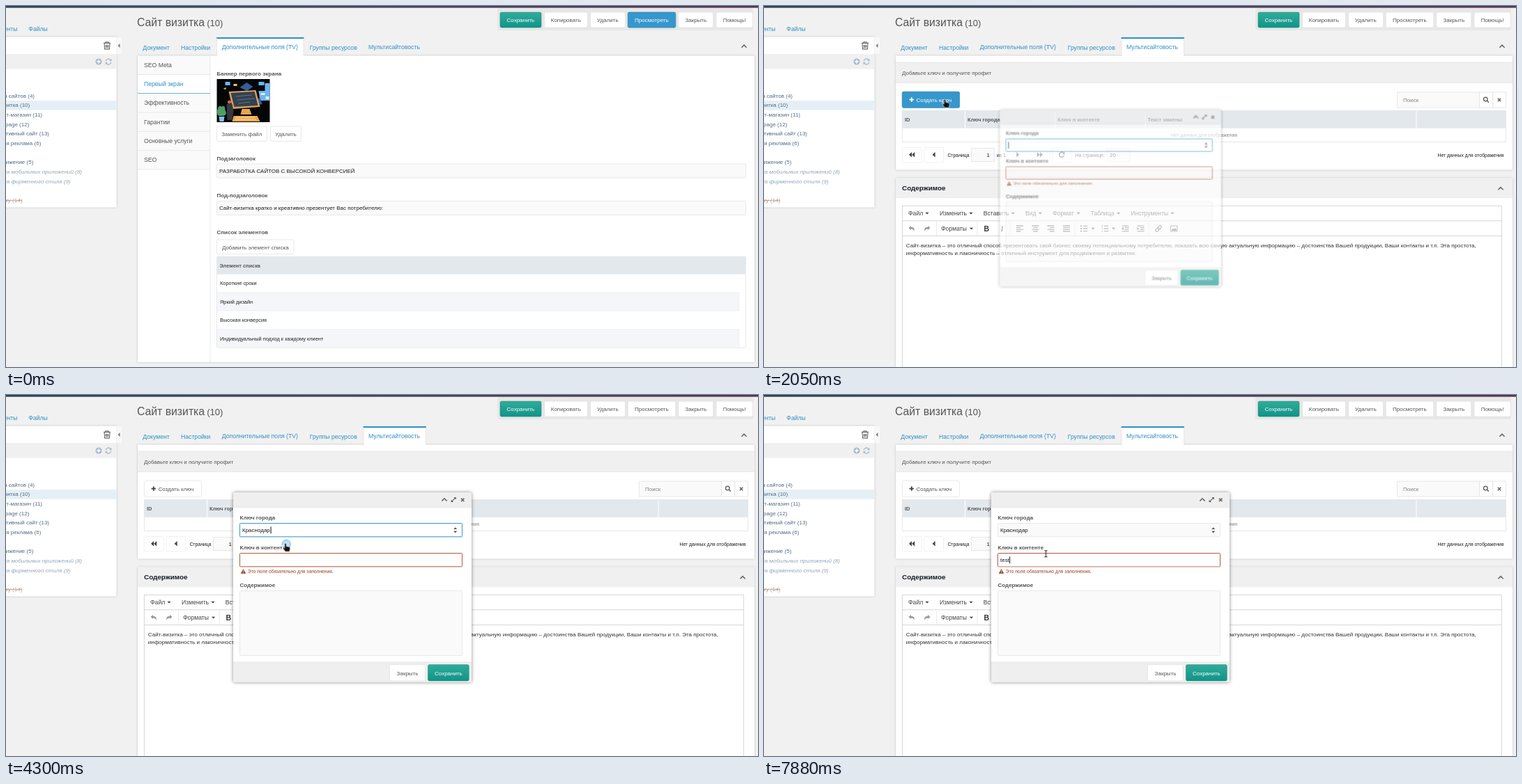
An HTML page that plays this animation: 1079x519 px, repeating every 8000 ms.

```html
<!DOCTYPE html>
<html lang="ru">
<head>
<meta charset="utf-8">
<title>Мультисайтовость</title>
<style>
html, body { margin: 0; width: 100%; height: 100%; overflow: hidden; background: #f1f1f1; }
svg { display: block; width: 1079px; height: 519px; font: 8px "Liberation Sans", Arial, sans-serif; fill: #555; }
.tab { font-size: 8.667px; }
.small { font-size: 7.4px; }
.tiny { font-size: 6.9px; }
.bold { font-weight: bold; }
.blue { fill: #3190c4; }
.dark { fill: #1a1a1a; }
.white { fill: #fff; }
.mid { text-anchor: middle; }
.end { text-anchor: end; }
.panel { fill: #fff; filter: drop-shadow(0 0 1.5px #0003); }
.btn { fill: #fff; stroke: #e2e2e2; stroke-width: .8; }
.inp { fill: #fafafa; stroke: #e4e4e4; stroke-width: .8; }
.on { fill: #3697cd; stroke: #2d86b8; stroke-width: .8; }
.save { fill: url(#green); stroke: #16907f; stroke-width: .6; }
.band { fill: #f0f0f0; }
.head { fill: #e3e8ed; }
.alt { fill: #f4f6fa; }
.rule { fill: none; stroke: #e4e4e4; stroke-width: .8; }
.line { fill: none; stroke: #666; stroke-width: 1.6; }
.edit { fill: none; stroke: #ccc; stroke-width: .8; }
.focus { fill: #fff; stroke: #3697cd; }
.error { fill: #fffdfc; stroke: #b0593f; }
.warn { fill: #9a3d22; }

.step { opacity: 0; animation: 8s step-end infinite; }
.tv { animation-name: tv; }
.site { animation-name: site; }
.view { animation-name: view; }
.hover { animation-name: hover; }
.trigger { animation-name: trigger; }
.list { animation-name: list; }
.city { animation-name: city; }
.first { animation-name: first; }
.second { animation-name: second; }
.caret1 { animation-name: caret1; }
.caret2 { animation-name: caret2; }
.typing { animation: typing 8s step-end infinite; }
.arrow { animation-name: arrow; }
.hand { animation-name: hand; }
.beam { animation-name: beam; }
.key { fill-opacity: 0; animation: 8s step-end infinite; }
.k1 { animation-name: k1; }
.k2 { animation-name: k2; }
.k3 { animation-name: k3; }
.k4 { animation-name: k4; }
.dialog { transform-origin: 497px 276px; animation: pop 8s ease-out infinite; }
.cursor { animation: move 8s ease-in-out infinite; }
.ring { fill: #62b2e2; fill-opacity: .5; stroke: #3697cd; stroke-width: 1; animation: ring 8s ease-in infinite; }

@keyframes tv { 0% { opacity: 1 } 6.125%, 100% { opacity: 0 } }
@keyframes site { 6.125%, 100% { opacity: 1 } }
@keyframes view { 0% { opacity: 1 } 18.75%, 100% { opacity: 0 } }
@keyframes hover { 16.6% { opacity: 1 } 26.2%, 100% { opacity: 0 } }
@keyframes trigger { 39.2% { opacity: 1 } 47.6%, 100% { opacity: 0 } }
@keyframes list { 41% { opacity: 1 } 52.25%, 100% { opacity: 0 } }
@keyframes city { 52.25%, 100% { opacity: 1 } }
@keyframes first { 0% { opacity: 1 } 57.5%, 100% { opacity: 0 } }
@keyframes second { 57.5%, 100% { opacity: 1 } }
@keyframes caret1 {
  0% { opacity: 1 } 39% { opacity: 0 } 41% { opacity: 1 } 48.5% { opacity: 0 }
  52.25% { opacity: 1; transform: translateX(40.5px) } 57.5%, 100% { opacity: 0 }
}
@keyframes caret2 {
  57.5% { opacity: 1 } 65% { opacity: 0 } 72.375% { opacity: 1 }
  79.875% { opacity: 0 } 87.25%, 100% { opacity: 1 }
}
@keyframes typing {
  92.875% { transform: translateX(2.2px) } 95.25% { transform: translateX(6.7px) }
  96.875% { transform: translateX(10.7px) } 98.5%, 100% { transform: translateX(12.9px) }
}
@keyframes k1 { 92.875%, 100% { fill-opacity: 1 } }
@keyframes k2 { 95.25%, 100% { fill-opacity: 1 } }
@keyframes k3 { 96.875%, 100% { fill-opacity: 1 } }
@keyframes k4 { 98.5%, 100% { fill-opacity: 1 } }
@keyframes pop {
  0%, 24.25% { opacity: 0; transform: scale(.8) }
  27.25%, 100% { opacity: 1; transform: none }
}
@keyframes arrow {
  4.875% { opacity: 1 } 16.6% { opacity: 0 } 26.2% { opacity: 1 } 30.5%, 100% { opacity: 0 }
}
@keyframes hand {
  16.6% { opacity: 1 } 26.2% { opacity: 0 } 39.2% { opacity: 1 } 54.5%, 100% { opacity: 0 }
}
@keyframes beam { 30.5% { opacity: 1 } 39.2% { opacity: 0 } 54.5%, 100% { opacity: 1 } }
@keyframes move {
  0%, 4.875% { transform: translate(550px, 78px) }
  6.125% { transform: translate(540px, 66px) }
  9% { transform: translate(541px, 67px) }
  17.75% { transform: translate(259px, 135px) }
  25% { transform: translate(258px, 134px) }
  31% { transform: translate(380px, 184px) }
  33.75% { transform: translate(381px, 185px) }
  36% { transform: translate(430px, 194px) }
  39.75%, 46.25% { transform: translate(640px, 195.5px) }
  51%, 53.1% { transform: translate(402px, 213px) }
  56.5%, 100% { transform: translate(404.5px, 228px) }
}
@keyframes ring {
  0%, 6.12%, 10.1%, 18.74%, 22.75%, 31.49%, 35.5%, 40.99%, 45%, 52.24%, 56.2%, 57.49%, 61.5%, 100% {
    opacity: 0; transform: scale(1.15)
  }
  6.125%, 18.75%, 31.5%, 41%, 52.25%, 57.5% { opacity: 1; transform: scale(.9) }
}
</style>
</head>
<body>
<svg viewBox="0 0 1079 519">
<defs>
  <linearGradient id="green" x2="0" y2="1"><stop stop-color="#32ab9a"/><stop offset="1" stop-color="#0f9488"/></linearGradient>
  <linearGradient id="top"><stop stop-color="#2c4257"/><stop offset=".5" stop-color="#444560"/><stop offset="1" stop-color="#543556"/></linearGradient>
  <path id="up" class="line" d="M-3.6 1.9 0-1.7 3.6 1.9"/>
  <path id="x" class="line" d="M-2.2-2.2 2.2 2.2M2.2-2.2-2.2 2.2"/>
  <path id="down" d="M-2.6-1.3h5.2L0 1.5z"/>
  <path id="prev" d="M2-3.7v7.4L-2 0z"/>
  <path id="spin" d="M-2.5-1.2 0-4.1 2.5-1.2zM-2.5 1.2 0 4.1 2.5 1.2z"/>
  <g id="reload">
    <path d="M3.4 1.2A3.6 3.6 0 1 1 2.6-2.6" fill="none" stroke="currentColor" stroke-width="1.5"/>
    <path d="M4.3-4.3V-.6H.6z" fill="currentColor"/>
  </g>
  <path id="undo" d="M-4.5-1-1-4v2C3-2 4.5 0 3.4 4 3 1.5 1.5.4-1 .4V2z"/>
  <path id="rows" class="line" stroke-width="1.3" d="M-5-3.9H5M-5-1.3H5M-5 1.3H5M-5 3.9H5"/>
  <g id="dent"><path class="line" style="stroke-width:1.3" d="M-5-3.9H5M-1-1.3H5M-1 1.3H5M-5 3.9H5"/></g>
</defs>

<rect width="1079" height="519" fill="#f1f1f1"/>
<rect width="1079" height="2.6" fill="url(#top)"/>

<!-- sidebar -->
<g class="tab blue">
  <text class="end" x="16.5" y="36.2">Элементы</text><text x="32.3" y="36.2">Файлы</text>
</g>
<rect class="panel" x="-5" y="44.5" width="163.5" height="245"/>
<rect class="band" y="69" width="158.5" height="21.5"/>
<rect x="158.5" y="45" width="7.5" height="24" fill="#f8f8f8"/>
<path d="M163.5 54v6l-3-3z" fill="#777"/>
<g transform="translate(145 57)">
  <path class="line" style="stroke-width:1.1" d="M-5-3.6H5M-2-3.8v-1.5h4v1.5M-3.9-3.4l.5 8.3h6.8l.5-8.3M-1.6-1.3v4.2M0-1.3v4.2M1.6-1.3v4.2"/>
</g>
<circle cx="133" cy="80" r="4.6" fill="#a9bccb"/>
<path d="M130.3 80h5.4M133 77.3v5.4" stroke="#fff" stroke-width="1.4"/>
<g transform="translate(147 80)" color="#a9bccb" fill="none" stroke="currentColor" stroke-width="1.4">
  <path d="M-3.8-.8A3.8 3.8 0 0 1 3-2.4M3.8.8A3.8 3.8 0 0 1-3 2.4"/>
  <path d="M4.5-4.4v3.6H1zM-4.5 4.4V.8H-1z" fill="currentColor" stroke="none"/>
</g>
<rect y="136" width="158.5" height="13.6" fill="#e5eff6"/>
<g class="end" fill="#536a88">
  <text x="41" y="131.7">Разработка сайтов (4)</text>
  <text x="34.2" y="145.4">Сайт визитка (10)</text>
  <text x="52" y="159">Интернет-магазин (11)</text>
  <text x="33.3" y="172.7">Landing page (12)</text>
  <text x="62" y="186.3">Корпоративный сайт (13)</text>
  <text x="50.3" y="200">Контекстная реклама (6)</text>
  <text x="39.3" y="227.3">Продвижение (5)</text>
  <g font-style="italic" fill="#90a6b8">
    <text x="109" y="241">Разработка мобильных приложений (8)</text>
    <text x="92.5" y="254.7">Разработка фирменного стиля (9)</text>
  </g>
  <text x="23.3" y="282" fill="#b59b88" text-decoration="line-through">Почему (14)</text>
</g>

<!-- title and actions -->
<text x="188" y="29.3" font-size="15.75">Сайт визитка</text>
<text x="288.2" y="29.3" font-size="13.1">(10)</text>
<rect x="705" y="3" width="367" height="32" rx="3" fill="#e7e7e7"/>
<rect class="save" x="709" y="9" width="59" height="22" rx="2"/>
<rect class="btn" x="772.5" y="9" width="62" height="22" rx="2"/>
<rect class="btn" x="838.5" y="9" width="50" height="22" rx="2"/>
<rect class="btn" x="892.3" y="9" width="68.5" height="22" rx="2"/>
<rect class="btn" x="964.8" y="9" width="50" height="22" rx="2"/>
<rect class="btn" x="1019" y="9" width="52.5" height="22" rx="2"/>
<g class="mid">
  <text class="white" x="738.4" y="23">Сохранить</text><text x="803.3" y="23">Копировать</text>
  <text x="863.3" y="23">Удалить</text><text x="926.4" y="23">Просмотреть</text>
  <text x="989.8" y="23">Закрыть</text><text x="1045.2" y="23">Помощь!</text>
  <g class="step view">
    <rect class="on" x="892.3" y="9" width="68.5" height="22" rx="2"/>
    <text class="white" x="926.4" y="23">Просмотреть</text>
  </g>
</g>

<!-- page with extra fields -->
<g class="step tv">
  <rect class="panel" x="189" y="71.5" width="885" height="440.5"/>
  <rect x="189" y="72" width="104" height="163" fill="#fafafa"/>
  <rect x="189" y="98.5" width="104.5" height="27" fill="#fff"/>
  <path class="rule" d="M293 72V512M189 98.5h104M189 153h104M189 180.3h104M189 207.7h104M189 235h104"/>
  <path d="M189 125.6h104" stroke="#6fb0d6"/>
  <g class="tab">
    <text x="198" y="87.6">SEO Meta</text><text class="blue" x="198" y="115">Первый экран</text>
    <text x="198" y="142.3">Эффективность</text><text x="198" y="169.7">Гарантии</text>
    <text x="198" y="197">Основные услуги</text><text x="198" y="224.3">SEO</text>
  </g>
  <path d="M302.5 72V46h124.5v26" fill="#fff" stroke="#e2e2e2" stroke-width=".8"/>
  <path d="M302.2 46H427.4" stroke="#2a91c5" stroke-width="2"/>
  <g class="bold">
    <text x="302.5" y="99.7">Баннер первого экрана</text><text x="302.5" y="221.7">Подзаголовок</text>
    <text x="302.5" y="275">Под-подзаголовок</text><text x="302.5" y="328.4">Список элементов</text>
  </g>
  <g transform="translate(302.5 105)">
    <path d="M0 0h76v62H0z" fill="#050608"/>
    <path d="M12 4h7v5h-7zM60 4h8v5h-8zM69 6h7v11h-7zM60 17h16v14H62z" fill="#6fb4ee"/>
    <path d="M33 12l10-7 9 6-9 6zM54 30l8-3 3 9-9 2z" fill="#315f9d"/>
    <path d="M63 20h6v3h-6zM70 25h5v4h-5z" fill="#dcecf8"/>
    <path d="M17 18 56 16 62 40 23 43z" fill="#d9a15c"/>
    <path d="M20 20 54 18 59 38 25 40z" fill="#34414f"/>
    <path d="M27 25 50 23M29 30 54 28M31 35 48 33" stroke="#62748a" fill="none"/>
    <path d="M36 43h11l3 8H34zM24 53h34l4 8H22z" fill="#e9a64c"/>
    <path d="M27 55h28M26 58h30" stroke="#fbe2a4" fill="none"/>
    <path d="M1 44q2-8 6-4 5-4 5 5 4 5-2 8H3q-5-4-2-9z" fill="#4d9e68"/>
    <path d="M3 54h8l-1 7H4z" fill="#87bfe8"/>
    <circle cx="18" cy="33" r="2.6" fill="#bf6f48"/>
    <path d="M14 36h8l2 10-2 13h-7z" fill="#37383f"/>
    <path d="M9 14l4-2v3zM24 7h5v3h-5z" fill="#eec46a"/>
  </g>
  <rect class="btn" x="302.5" y="173" width="72" height="21.5" rx="2"/>
  <rect class="btn" x="379.5" y="173" width="44" height="21.5" rx="2"/>
  <rect class="btn" x="302.5" y="336" width="110.5" height="20.5" rx="2"/>
  <g class="mid">
    <text x="338.3" y="187.2">Заменить файл</text><text x="401.5" y="187.2">Удалить</text>
    <text x="357.8" y="349.7">Добавить элемент списка</text>
  </g>
  <rect class="inp" x="302.5" y="227" width="759" height="20" rx="1"/>
  <rect class="inp" x="302.5" y="280.4" width="759" height="20" rx="1"/>
  <text class="dark" x="306" y="239.8">РАЗРАБОТКА САЙТОВ С ВЫСОКОЙ КОНВЕРСИЕЙ</text>
  <text class="dark" x="306" y="293.1">Сайт-визитка кратко и креативно презентует Вас потребителю:</text>
  <rect class="btn" x="302.5" y="360.3" width="759" height="131" rx="1"/>
  <rect class="head" x="302.5" y="360" width="759" height="25.7"/>
  <path class="alt" d="M303 412h749v26H303zM303 465h749v26H303z"/>
  <path class="rule" stroke-opacity=".6" d="M303 411.8h749M303 438.2h749M303 464.8h749M1052 412v26M1052 465v26"/>
  <g class="small">
    <text class="bold" x="306.5" y="375.7">Элемент списка</text>
    <g fill="#222">
      <text x="307" y="401.2">Короткие сроки</text><text x="307" y="427.7">Яркий дизайн</text>
      <text x="307" y="454">Высокая конверсия</text><text x="307" y="480.5">Индивидуальный подход к каждому клиент</text>
    </g>
  </g>
</g>

<!-- multisite page -->
<g class="step site">
  <rect class="panel" x="189" y="71.5" width="885" height="164"/>
  <path d="M513 72V46h89.5v26" fill="#fff" stroke="#e2e2e2" stroke-width=".8"/>
  <path d="M512.6 46H602.9" stroke="#2a91c5" stroke-width="2"/>
  <rect class="band" x="189" y="81" width="885" height="29.3"/>
  <path class="rule" d="M189 81h885M189 110.3h885"/>
  <text x="198" y="98.9">Добавьте ключ и получите профит</text>
  <rect class="btn" x="198.3" y="123.3" width="82.3" height="23" rx="2"/>
  <path d="M208.6 134.6h6.4M211.8 131.4v6.4" stroke="#444" stroke-width="1.9"/>
  <text x="218.4" y="137.8">Создать ключ</text>
  <g class="step hover">
    <rect class="on" x="198.3" y="123.3" width="82.3" height="23" rx="2"/>
    <path d="M208.6 134.6h6.4M211.8 131.4v6.4" stroke="#fff" stroke-width="1.9"/>
    <text class="white" x="218.4" y="137.8">Создать ключ</text>
  </g>
  <rect class="inp" x="908.5" y="124" width="118" height="22"/>
  <rect class="btn" x="1026.5" y="124" width="19.3" height="22"/>
  <rect class="btn" x="1045.8" y="124" width="18.7" height="22"/>
  <text x="917" y="137.5" fill="#808080">Поиск</text>
  <circle class="line" style="stroke-width:1.4" cx="1035.3" cy="134" r="2.8"/><path class="line" d="M1037.3 136l2.6 2.6"/>
  <use href="#x" x="1055" y="135"/>

  <rect class="btn" x="198.3" y="150.6" width="866.4" height="45"/>
  <rect class="head" x="198" y="150.5" width="867" height="25.3"/>
  <path d="M288.5 151v25M418 151v25M547 151v25M936 151v25" stroke="#fff"/>
  <g class="small bold">
    <text x="202" y="165.7">ID</text><text x="292" y="165.7">Ключ города</text>
    <text x="421.3" y="165.7">Ключ в контенте</text><text x="550.5" y="165.7">Текст замены</text>
  </g>
  <text class="tiny mid" x="631.5" y="188" fill="#888">Нет данных для отображения</text>
  <g stroke-opacity=".6">
    <rect class="btn" x="198.3" y="203.5" width="28" height="21.5" rx="2"/><rect class="btn" x="230" y="203.5" width="27.5" height="21.5" rx="2"/>
    <rect class="btn" x="350.3" y="203.5" width="27.5" height="21.5" rx="2"/><rect class="btn" x="382" y="203.5" width="27.5" height="21.5" rx="2"/>
  </g>
  <rect class="btn" x="413.5" y="203.5" width="27.5" height="21.5" rx="2"/>
  <g fill="#444" color="#444">
    <use href="#prev" x="210" y="213.8"/><use href="#prev" x="214.2" y="213.8"/><use href="#prev" x="243.6" y="213.8"/>
    <use href="#prev" transform="translate(364.3 213.8) scale(-1 1)"/>
    <use href="#prev" transform="translate(393.8 213.8) scale(-1 1)"/><use href="#prev" transform="translate(398 213.8) scale(-1 1)"/>
    <use href="#reload" x="427.2" y="213.8"/>
  </g>
  <rect class="inp" x="297.5" y="204.5" width="33" height="19"/><rect class="inp" x="492" y="204.5" width="33" height="19"/>
  <g class="tiny dark">
    <text x="263.4" y="216.8">Страница</text><text x="334" y="216.8">из 1</text><text x="446.5" y="216.8">На странице:</text>
    <text class="end" x="1061.6" y="216.8">Нет данных для отображения</text>
  </g>
  <text class="dark" x="319.6" y="216.7">1</text><text class="dark" x="496" y="216.7">20</text>

  <rect class="panel" x="189" y="247.5" width="885" height="290"/>
  <rect class="band" x="189" y="247.5" width="885" height="28.8"/>
  <text class="bold" x="198" y="265.2" font-size="9.9" fill="#151c25">Содержимое</text>
  <use href="#up" x="1057" y="262.3"/>

  <rect class="edit" x="198.3" y="287.3" width="860" height="250"/>
  <path class="edit" d="M198 308.8h860M198 330.6h860"/>
  <path class="rule" d="M247.5 310v20M306 310v20M353 310v20M446 310v20M552 310v20"/>
  <g class="tab" fill="#444">
    <text x="207" y="301">Файл</text><text x="252" y="301">Изменить</text><text x="314.7" y="301">Вставить</text>
    <text x="375" y="301">Вид</text><text x="414" y="301">Формат</text><text x="468.5" y="301">Таблица</text>
    <text x="526.3" y="301">Инструменты</text><text x="254" y="323">Форматы</text>
    <use href="#down" x="234" y="298"/><use href="#down" x="297" y="298"/><use href="#down" x="357.3" y="298"/>
    <use href="#down" x="396.3" y="298"/><use href="#down" x="451" y="298"/><use href="#down" x="508.5" y="298"/>
    <use href="#down" x="586" y="298"/><use href="#down" x="297.5" y="320"/>
    <use href="#down" x="472" y="320"/><use href="#down" x="501.5" y="320"/>
  </g>
  <g fill="#999"><use href="#undo" x="212" y="320"/><use href="#undo" transform="translate(234 320) scale(-1 1)"/></g>
  <g fill="#333" class="mid">
    <text class="bold" x="319.3" y="323.7" font-size="10.5">B</text>
    <text x="341.6" y="323.7" font-size="10.5" font-style="italic" font-family="Liberation Serif, serif" font-weight="bold">I</text>
  </g>
  <g class="line" style="stroke-width:1.3">
    <path d="M362 316h10M362 318.6h6.5M362 321.3h10M362 324h6.5"/>
    <path d="M384.5 316h10M386.3 318.6h6.4M384.5 321.3h10M386.3 324h6.4"/>
    <path d="M406.5 316h10M410 318.6h6.5M406.5 321.3h10M410 324h6.5"/>
    <path d="M429 316h10M429 318.6h10M429 321.3h10M429 324h10"/>
    <path d="M458 316.3h6M458 320h6M458 323.7h6M488 316.3h6M488 320h6M488 323.7h6"/>
    <path d="M454 316.3h2M454 320h2M454 323.7h2" stroke-width="2"/>
    <path d="M485.3 314.8v3M484.5 320h1.8M484.5 323.7h1.8" stroke-width="1"/>
    <rect x="583.4" y="316" width="9.4" height="8" stroke-width="1"/>
    <g transform="rotate(-45 566 320)"><rect x="560.8" y="318.1" width="5.6" height="3.8" rx="1.9"/><rect x="565.6" y="318.1" width="5.6" height="3.8" rx="1.9"/></g>
  </g>
  <use href="#dent" x="518.5" y="320"/><use href="#dent" x="540.6" y="320"/>
  <path d="M516 317.8v4.4l-2.8-2.2zM535.5 317.8v4.4l2.8-2.2zM584.5 323l2.4-3.2 1.6 1.5 1.8-2.6 1.8 4.3z"/>
  <g font-size="8.04" fill="#333">
    <text x="203.8" y="347.2">Сайт-визитка – это отличный способ презентовать свой бизнес своему потенциальному потребителю, показать всю самую актуальную информацию – достоинства Вашей продукции, Ваши контакты и т.п. Эта простота,</text>
    <text x="203.8" y="358.4">информативность и лаконичность – отличный инструмент для продвижения и развития.</text>
  </g>
</g>

<g class="tab blue">
  <text x="196.3" y="62.6">Документ</text><text x="251" y="62.6">Настройки</text>
  <text x="309.7" y="62.2">Дополнительные поля (TV)</text>
  <text x="435.7" y="62.6">Группы ресурсов</text><text x="520" y="62.2">Мультисайтовость</text>
</g>
<use href="#up" x="1059" y="57.8"/>

<!-- dialog -->
<g class="dialog">
  <rect x="326" y="140" width="342" height="273" rx="2.5" fill="#fff" style="filter:drop-shadow(0 0 2.5px #0007)"/>
  <path d="M326 161.5V142.500q0-2.500 2.500-2.500h337q2.500 0 2.500 2.500v19zM326 384h342v26.500q0 2.500-2.500 2.500h-337q-2.500 0-2.500-2.500z" fill="#efefef"/>
  <path class="rule" d="M326 161.5h342M326 384h342"/>
  <use href="#up" x="629" y="150.500"/><use href="#x" x="655.2" y="150.800"/>
  <path d="M640 152.700l4.200-4.200" class="line" style="stroke-width:1.1"/>
  <path d="M642.500 147h3.300v3.300zM638.600 150.800v3.300h3.300z"/>
  <g class="bold">
    <text x="335.5" y="178.800">Ключ города</text><text x="335.5" y="221.800">Ключ в контенте</text>
    <text x="335.5" y="275.800">Содержимое</text>
  </g>
  <rect class="inp" x="335.5" y="184.500" width="319" height="19.300" rx="1"/>
  <rect class="step first focus" x="335.5" y="184.500" width="319" height="19.300" rx="1"/>
  <use href="#spin" x="644.7" y="194.300"/>
  <g class="step trigger">
    <rect class="on" x="635.500" y="184.700" width="18.800" height="18.900"/>
    <use class="white" href="#spin" x="644.7" y="194.300"/>
  </g>
  <text class="dark step city" x="339" y="197.100">Краснодар</text>
  <path class="step caret1" d="M339.600 189.300v10" stroke="#111"/>
  <rect class="error" x="335.5" y="227.500" width="319" height="19.300" rx="1"/>
  <rect class="step second" x="336" y="228" width="318" height="18.300" fill="#fff"/>
  <text class="dark" x="339" y="239.800"><tspan class="key k1">t</tspan><tspan class="key k2">e</tspan><tspan class="key k3">s</tspan><tspan class="key k4">t</tspan></text>
  <g class="typing"><path class="step caret2" d="M339.700 232.300v10" stroke="#111"/></g>
  <path class="warn" d="M340.500 250l3.700 6.700h-7.400z"/>
  <path d="M340.500 252.300v2M340.500 255.100v.9" stroke="#fff" stroke-width=".9"/>
  <text class="warn" x="346.800" y="256" font-size="6.730">Это поле обязательно для заполнения.</text>
  <rect class="inp" x="335.5" y="281.500" width="319" height="93" rx="1"/>
  <rect class="btn" x="550.300" y="387.700" width="51" height="23.300" rx="2"/>
  <rect class="save" x="605.500" y="387.700" width="58.700" height="23.300" rx="2"/>
  <g class="mid"><text x="576" y="402.700">Закрыть</text><text class="white" x="634.900" y="402.700">Сохранить</text></g>
  <g class="step list">
    <rect class="focus" x="335.5" y="204" width="319" height="53.500"/>
    <rect x="336" y="204.500" width="318" height="17.500" fill="#e5eff6"/>
    <g class="bold">
      <text x="339" y="215.800">Краснодар</text><text x="339" y="233">Санкт-Петербург</text><text x="339" y="250.300">Москва</text>
    </g>
    <g font-size="6.750" fill="#777">
      <text x="384.300" y="215.600">(krd)</text><text x="408.300" y="232.800">(spb)</text><text x="370.700" y="250.100">(moscow)</text>
    </g>
    <path d="M648 261.300l3.700-3.400M650.200 261.300l1.800-1.700" stroke="#888" stroke-width=".8"/>
  </g>
</g>

<!-- pointer -->
<g class="cursor">
  <circle class="ring" r="6.300"/>
  <path class="step arrow" d="M-1.500-2V9.300L1.300 6.700 3.200 11 5.300 10 3.500 6H7.200z" fill="#111" stroke="#fff" stroke-width=".7"/>
  <path class="step hand" d="M-2.500.5Q-2.500-1-1.200-1T0 .5V3.300L4.500 4.300Q5.800 4.800 5.500 6.300L4.600 11H-1.500L-4.300 7Q-5-4.500-4.600 5-3.500 4.500-2.500 6z" fill="#111" stroke="#fff" stroke-width=".6"/>
  <path class="step beam" d="M-2-4.500Q0-4.500 0-3.500 0-4.500 2-4.500M0-3.500V4M-2 4.900Q0 4.900 0 4 0 4.900 2 4.900" fill="none" stroke="#222" stroke-width="1.100"/>
</g>
</svg>
</body>
</html>
```
